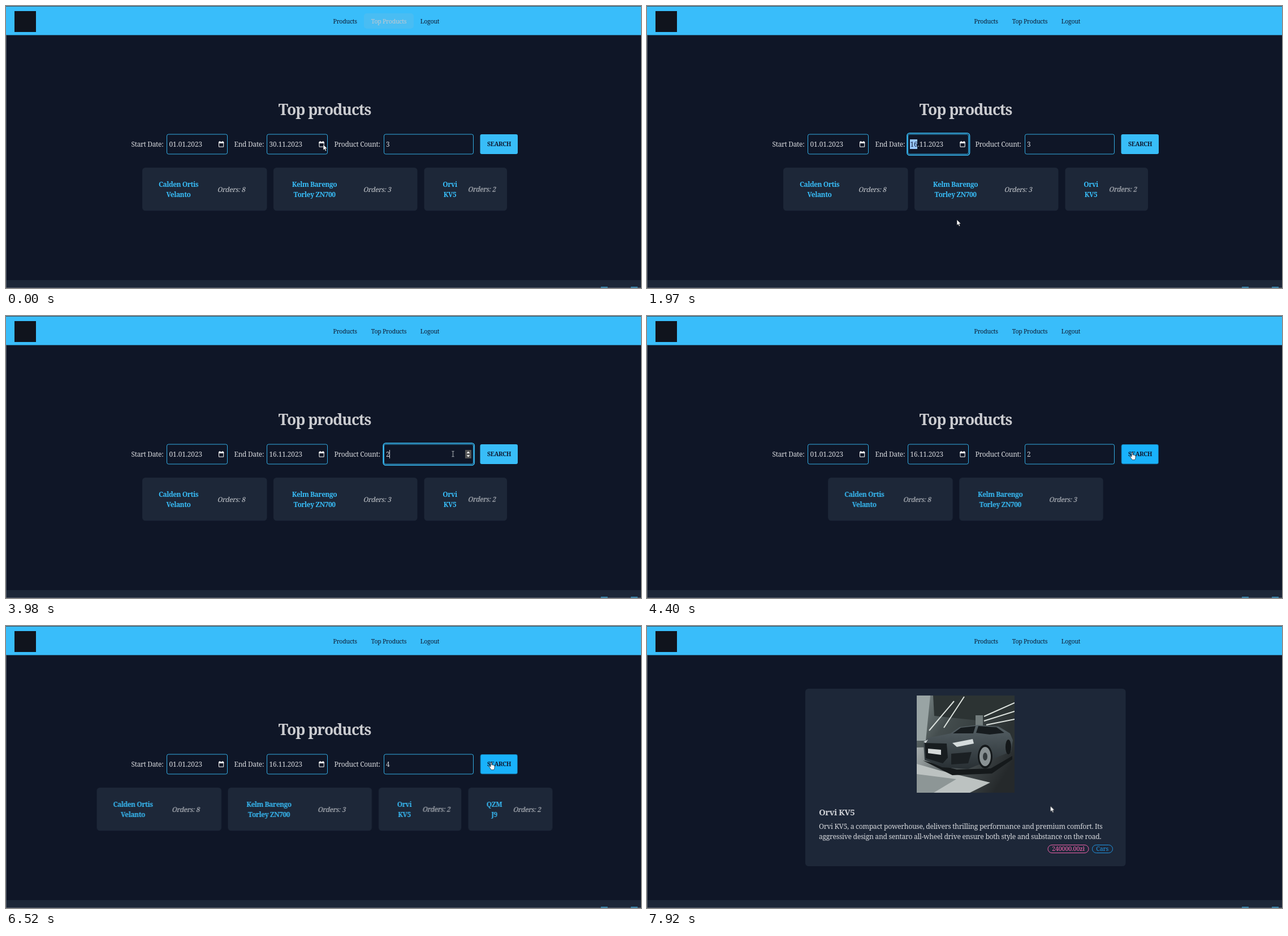
An HTML page for the animation above (8 s loop, 1123 by 499 pixels).

```html
<!DOCTYPE html>
<html lang="en">
<head>
<meta charset="utf-8">
<title>Top products</title>
<style>
html, body { margin: 0; width: 100%; height: 100%; overflow: hidden; background: #0f1627; }
svg { display: block; width: 100%; height: 100%; }
text { font: 12px "Noto Serif", serif; letter-spacing: -.025em; fill: #d6d8dc; white-space: pre; }
.mid { text-anchor: middle; }
.nav text { font-size: 10.6px; fill: #0f1c33; }
.nav .pill text { fill: #c3c9d1; }
.title { font-size: 26.5px; font-weight: 700; letter-spacing: -.04em; fill: #cbccd0; }
.value { font-size: 11.8px; letter-spacing: 0; }
.day .value { fill: #14203a; }
.name { font-weight: 700; letter-spacing: -.04em; fill: #38bdf8; }
.orders { font-size: 11.8px; fill: #c9ccd1; }
.search { font-size: 10.7px; font-weight: 600; letter-spacing: -.04em; fill: #0f1c33; }
.box { fill: #0f1627; stroke: #38bdf8; stroke-width: .9; }
.ring { fill: none; stroke: #38bdf8; stroke-width: 1.7; }
.card { fill: #1d2738; }
.heading { font-size: 15px; font-weight: 600; letter-spacing: -.04em; fill: #cfd1d6; }
.body { font-size: 12.2px; }
.tag rect { fill: none; stroke: currentColor; }
.tag text { font-size: 10.6px; letter-spacing: -.01em; fill: currentColor; }
.picker text { font: 8.6px Roboto, sans-serif; letter-spacing: 0; fill: #fff; }
.picker .dim { fill: #9a9a9a; }
.picker .dark { fill: #202124; }
.picker .link { fill: #99c8ff; }

/* All states share one 8 s clock; step-end holds each state until the next. */
.a { animation: 8s step-end infinite; }
.pill { animation-name: pill; }
.ring-end { animation-name: ringEnd; }
.picker { animation-name: picker; }
.aim { animation-name: aim; }
.before { animation-name: before; }
.after { animation-name: after; }
.ring-count { animation-name: ringCount; }
.spin { animation-name: spin; }
.caret { animation-name: caret; }
.n3 { animation-name: n3; }
.n2 { animation-name: n2; }
.n4 { animation-name: n4; }
.btn { animation-name: btn; fill: #38bdf8; transform-box: fill-box; transform-origin: center; }
.row { animation-name: row; }
.third { animation-name: third; }
.fourth { animation-name: fourth; }
.hover { animation-name: hover; }
.hover .name { fill: #1cabf0; text-decoration: underline; }
.list { animation-name: list; }
.detail { animation-name: detail; }
.cursor { animation-name: cursor; }
.arrow { animation-name: arrow; }
.beam { animation-name: beam; }
.hand { animation-name: hand; }

@keyframes pill { 0% { opacity: 1 } 1.5% { opacity: .5 } 3.1% { opacity: 0 } }
@keyframes ringEnd { 0%, 38.75% { opacity: 0 } 1.5% { opacity: 1 } }
@keyframes picker { 0%, 24.62% { opacity: 0 } 3.1% { opacity: 1 } }
@keyframes aim { 0% { opacity: 0 } 15.5% { opacity: 1 } }
@keyframes before { 0% { opacity: 1 } 24.62% { opacity: 0 } }
@keyframes after { 0% { opacity: 0 } 24.62% { opacity: 1 } }
@keyframes ringCount { 0%, 53.5%, 79.62% { opacity: 0 } 38.75%, 62.12% { opacity: 1 } }
@keyframes spin { 0%, 53.5%, 79.62% { opacity: 0 } 37.08%, 58.62% { opacity: 1 } }
@keyframes caret {
  0%, 45.5%, 69% { transform: none }
  43.6%, 65.5% { transform: translateX(-6.5px) }
}
@keyframes n3 { 0% { opacity: 1 } 43.6% { opacity: 0 } }
@keyframes n2 { 0%, 65.5% { opacity: 0 } 45.5% { opacity: 1 } }
@keyframes n4 { 0% { opacity: 0 } 69% { opacity: 1 } }
@keyframes btn {
  0%, 56.87%, 83.37% { fill: #38bdf8; transform: none }
  51.83%, 76% { fill: #19b2fb; transform: scale(.985) }
}
@keyframes row {
  0% { transform: none }
  53.5% { transform: translateX(79.2px) }
  79.62% { transform: translateX(-80.5px) }
}
@keyframes third { 0%, 79.62% { opacity: 1 } 53.5% { opacity: 0 } }
@keyframes fourth { 0% { opacity: 0 } 79.62% { opacity: 1 } }
@keyframes hover { 0% { opacity: 0 } 89.72% { opacity: 1 } }
@keyframes list { 0% { opacity: 1 } 99% { opacity: 0 } }
@keyframes detail { 0% { opacity: 0 } 99% { opacity: 1 } }
@keyframes cursor {
  0% { transform: translate(561px, 245px) }
  10.25% { transform: translate(561px, 245px); animation-timing-function: steps(4, start) }
  17.25% { transform: translate(548px, 378px) }
  26.37% { transform: translate(548px, 378px); animation-timing-function: steps(7, start) }
  38.87% { transform: translate(723px, 247px) }
  47.25% { transform: translate(723px, 247px); animation-timing-function: steps(4, start) }
  53.37% { transform: translate(858px, 241px) }
  56.87% { transform: translate(858px, 241px); animation-timing-function: steps(4, start) }
  63.87% { transform: translate(745px, 247px) }
  70.75% { transform: translate(745px, 247px); animation-timing-function: steps(3, start) }
  75.8% { transform: translate(832px, 249px) }
  76% { transform: translate(832px, 249px); animation-timing-function: steps(2, start) }
  79.5% { transform: translate(858px, 241px) }
  83.37% { transform: translate(858px, 241px); animation-timing-function: steps(5, start) }
  91.3%, 100% { transform: translate(713.5px, 318.5px) }
}
@keyframes arrow {
  0%, 50.31%, 56.87%, 74.12%, 83.37%, 99% { opacity: 1 }
  37.08%, 51.83%, 58.62%, 76%, 89.72% { opacity: 0 }
}
@keyframes beam { 0%, 50.31%, 74.12% { opacity: 0 } 37.08%, 58.62% { opacity: 1 } }
@keyframes hand { 0%, 56.87%, 83.37%, 99% { opacity: 0 } 51.83%, 76%, 89.72% { opacity: 1 } }
</style>
</head>
<body>
<svg viewBox="0 0 1123 499" preserveAspectRatio="none">
  <defs>
    <g id="calendar">
      <path d="M-4 -3.5h8.2v8.2h-8.2z" fill="none" stroke="#fff"/>
      <path d="M-4.5 -4.2h9.2v2.6h-9.2zM-3 -5.4h1.3v1.6h-1.3zM2 -5.4h1.3v1.6h-1.3z" fill="#fff"/>
    </g>
    <linearGradient id="wall" x2="1" y2=".4">
      <stop offset="0" stop-color="#7e8a8a"/><stop offset=".4" stop-color="#444d4e"/><stop offset="1" stop-color="#2b3132"/>
    </linearGradient>
    <linearGradient id="floor" x2="1" y2=".3">
      <stop offset="0" stop-color="#aab1b1"/><stop offset=".5" stop-color="#4d5557"/><stop offset="1" stop-color="#25292b"/>
    </linearGradient>
    <linearGradient id="paint" x2="0" y2="1">
      <stop offset="0" stop-color="#566166"/><stop offset="1" stop-color="#282f33"/>
    </linearGradient>
    <clipPath id="frame"><path d="M477 123h173v172h-173z"/></clipPath>
  </defs>

  <rect width="1123" height="499" fill="#0f1627"/>
  <rect width="1123" height="51.5" fill="#39bdfa"/>
  <rect x="15" y="9" width="38" height="37" fill="#10141d"/>
  <g class="nav">
    <text class="mid" x="599.7" y="30.5">Products</text>
    <text class="mid" x="677" y="30.5">Top Products</text>
    <text class="mid" x="749.5" y="30.5">Logout</text>
    <g class="a pill">
      <rect x="633" y="13" width="88" height="27" rx="5" fill="#49bdf3"/>
      <text class="mid" x="677" y="30.5">Top Products</text>
    </g>
  </g>

  <g class="a list">
    <text class="title mid" x="563.5" y="192.5">Top products</text>

    <text x="221.5" y="249">Start Date:</text>
    <rect class="box" x="284.5" y="227" width="107" height="35" rx="3"/>
    <text class="value" x="288.5" y="249">01.01.2023</text>
    <use href="#calendar" x="380.5" y="244.5"/>

    <text x="403.5" y="249">End Date:</text>
    <rect class="box" x="461.5" y="227" width="107" height="35" rx="3"/>
    <text class="value a before" x="465.5" y="249">30.11.2023</text>
    <text class="value a after" x="465.5" y="249">16.11.2023</text>
    <use href="#calendar" x="558" y="244.5"/>
    <g class="a ring-end day">
      <rect class="ring" x="460" y="225" width="110.5" height="39" rx="4.5"/>
      <rect x="465" y="236" width="13" height="17" fill="#99c8ff"/>
      <text class="value a before" x="465.5" y="249">30</text>
      <text class="value a after" x="465.5" y="249">16</text>
    </g>

    <text x="580.5" y="249">Product Count:</text>
    <rect class="box" x="668.5" y="227" width="158" height="35" rx="3"/>
    <text class="value a n3" x="672" y="249">3</text>
    <text class="value a n2" x="672" y="249">2</text>
    <text class="value a n4" x="672" y="249">4</text>
    <g class="a ring-count">
      <rect class="ring" x="667.2" y="225" width="161" height="39" rx="4.5"/>
      <rect class="a caret" x="678" y="237" width=".9" height="15" fill="#e4e6ea"/>
    </g>
    <g class="a spin">
      <rect x="812" y="237" width="11" height="15" fill="#545556"/>
      <path d="M814.6 243l2.9 -3.4 2.9 3.4zM814.6 246.2l2.9 3.4 2.9 -3.4z" fill="#fff"/>
    </g>

    <rect class="a btn" x="838.5" y="227" width="66.5" height="35" rx="3"/>
    <text class="search mid" x="872" y="248.3">SEARCH</text>

    <g class="a row">
      <rect class="card" x="241" y="286" width="220.5" height="76.3" rx="5.5"/>
      <text class="name mid" x="305" y="320">Calden Ortis</text>
      <text class="name mid" x="305" y="338">Velanto</text>
      <text class="orders" transform="translate(373.5 329) skewX(-14)">Orders: 8</text>

      <rect class="card" x="473" y="286" width="254.5" height="76.3" rx="5.5"/>
      <text class="name mid" x="545.5" y="320">Kelm Barengo</text>
      <text class="name mid" x="545.5" y="338">Torley ZN700</text>
      <text class="orders" transform="translate(631.5 329) skewX(-14)">Orders: 3</text>

      <g class="a third">
        <rect class="card" x="739.5" y="286" width="146.5" height="76.3" rx="5.5"/>
        <text class="name mid" x="785" y="320">Orvi</text>
        <text class="name mid" x="785" y="338">KV5</text>
        <g class="a hover">
          <text class="name mid" x="785" y="320">Orvi</text>
          <text class="name mid" x="785" y="338">KV5</text>
        </g>
        <text class="orders" transform="translate(816.5 329) skewX(-14)">Orders: 2</text>
      </g>

      <g class="a fourth">
        <rect class="card" x="898" y="286" width="149" height="76.3" rx="5.5"/>
        <text class="name mid" x="944" y="320">QZM</text>
        <text class="name mid" x="944" y="338">J9</text>
        <text class="orders" transform="translate(977 329) skewX(-14)">Orders: 2</text>
      </g>
    </g>

    <g class="a picker">
      <rect x="461.5" y="265.5" width="162" height="204" fill="#3b3b3b" stroke="#6b6b6b" stroke-width=".8"/>
      <text x="470" y="284">November 2023</text>
      <path d="M589 283l3.5 -4 3.5 4M606 279l3.5 4 3.5 -4" fill="none" stroke="#fff"/>
      <g id="days"></g>
      <text class="link" x="470" y="460">Clear</text>
      <text class="link" x="592" y="460">Today</text>
    </g>
  </g>

  <g class="a detail">
    <rect class="card" x="280" y="111" width="566.5" height="314" rx="5.5"/>
    <g clip-path="url(#frame)">
      <path d="M477 123h173v110h-173z" fill="url(#wall)"/>
      <path d="M477 123h24l-8 80h-16z" fill="#99a4a4"/>
      <path d="M506 123h144v34l-66 10 -76 -8z" fill="#2c3333"/>
      <path d="M581 158h13v30h-13z" fill="#727c7c"/>
      <path d="M543 133l-44 52M561 125l-36 55M596 160l54 -24M596 168l54 -17M600 175l50 -10" stroke="#dde3df" stroke-width="2"/>
      <path d="M477 215l173 -5v85h-173z" fill="url(#floor)"/>
      <path d="M477 244l42 12 88 21 -36 18h-94z" fill="#bcc2c1"/>
      <path d="M477 262l70 9 -40 24h-30z" fill="#8d9696"/>
      <path d="M488 238l60 16 60 -2 38 -22v6l-36 25 -70 3z" fill="#15191b"/>
      <path d="M489 208l8 -10 40 -8 16 -11 32 -4 37 3 20 12 5 12 -3 20 -34 14 -42 17 -46 -3 -31 -13z" fill="url(#paint)"/>
      <path d="M541 190l14 -10 26 -3 -4 13zM582 189l4 -12 32 2 14 10 -26 3z" fill="#171c1f"/>
      <path d="M491 207l39 1 2 25 -9 10 -30 -9z" fill="#181d20"/>
      <path d="M540 207l36 -7 2 8 -30 6zM489 205l8 -4 -4 6z" fill="#d5dbdc"/>
      <path d="M497 217l23 2v9l-23 -3z" fill="#d4d8d8"/>
      <path d="M538 226l36 -3 -6 20 -30 2z" fill="#1b2023"/>
      <ellipse cx="598" cy="231" rx="13" ry="21" fill="#14181a"/>
      <ellipse cx="598" cy="231" rx="10" ry="17" fill="#899193"/>
      <ellipse cx="598" cy="231" rx="4" ry="7" fill="#343b3e"/>
      <ellipse cx="639" cy="214" rx="5" ry="13" fill="#14181a"/>
    </g>
    <text class="heading" x="304" y="334.5">Orvi KV5</text>
    <text class="body" x="304" y="359">Orvi KV5, a compact powerhouse, delivers thrilling performance and premium comfort. Its</text>
    <text class="body" x="304" y="377">aggressive design and sentaro all-wheel drive ensure both style and substance on the road.</text>
    <g class="tag" color="#f062ab">
      <rect x="709" y="387.5" width="72" height="14" rx="7"/>
      <text class="mid" x="745" y="398.3">240000.00zł</text>
    </g>
    <g class="tag" color="#2196e3">
      <rect x="787.5" y="387.5" width="36" height="14" rx="7"/>
      <text class="mid" x="805.2" y="398.3">Cars</text>
    </g>
  </g>

  <rect y="485" width="1123" height="14" fill="#1d2738"/>
  <path d="M1052 497.5h12M1105 497.5h12" stroke="#38bdf8" stroke-width="1.2"/>
  <path d="M0 .5h1123" stroke="#3d4a55"/>
  <path d="M.5 51v448M0 498.6h1123" stroke="#5f6672" stroke-width=".9"/>

  <g class="a cursor">
    <path class="a arrow" d="M0 0v10.2l2.3 -2.1 1.6 3.6 1.8 -.8 -1.6 -3.4h3.1z" fill="#fff" stroke="#10131a" stroke-width=".6"/>
    <path class="a beam" d="M-2 -4.7h1.5l.5 .6 .5 -.6h1.5M0 -4v8.2M-2 4.8h1.5l.5 -.6 .5 .6h1.5" fill="none" stroke="#d4d6da" stroke-width=".9"/>
    <path class="a hand" d="M-.9 .6q1 -1.4 1.9 0v4.4q.9 -.8 1.8 .2 .9 -.6 1.7 .3 1.3 -.4 1.5 .9v3.4q-.2 2 -1.2 3.6h-4.6q-2 -2.5 -3.8 -5.6 0 -1.5 1.5 -.7l1.2 1.1z" fill="#fff" stroke="#10131a" stroke-width=".7"/>
  </g>
</svg>
<script>
const NS = "http://www.w3.org/2000/svg";
const days = document.getElementById("days");
const colX = i => 476 + 22 * i;
const rowY = i => 330 + 21 * i;

function add(tag, attrs, text = "") {
  const el = document.createElementNS(NS, tag);
  for (const key in attrs) el.setAttribute(key, attrs[key]);
  el.textContent = text;
  days.append(el);
}

function cell(col, row, fill, cls) {
  add("rect", { x: colX(col) - 10, y: rowY(row) - 10, width: 20, height: 20, rx: 2, fill, class: cls });
}

["Mo", "Tu", "We", "Th", "Fr", "Sa", "Su"].forEach((name, i) =>
  add("text", { x: colX(i), y: 312, class: "mid dim" }, name));
cell(3, 4, "#99c8ff", "");
cell(3, 2, "#5c5c5c", "a aim");
for (let i = 0; i < 42; i++) {
  const date = new Date(2023, 9, 30 + i);
  const inMonth = date.getMonth() === 10;
  const cls = !inMonth ? "mid dim" : date.getDate() === 30 ? "mid dark" : "mid";
  add("text", { x: colX(i % 7), y: rowY(Math.floor(i / 7)) + 3, class: cls }, date.getDate());
}
</script>
</body>
</html>
```
